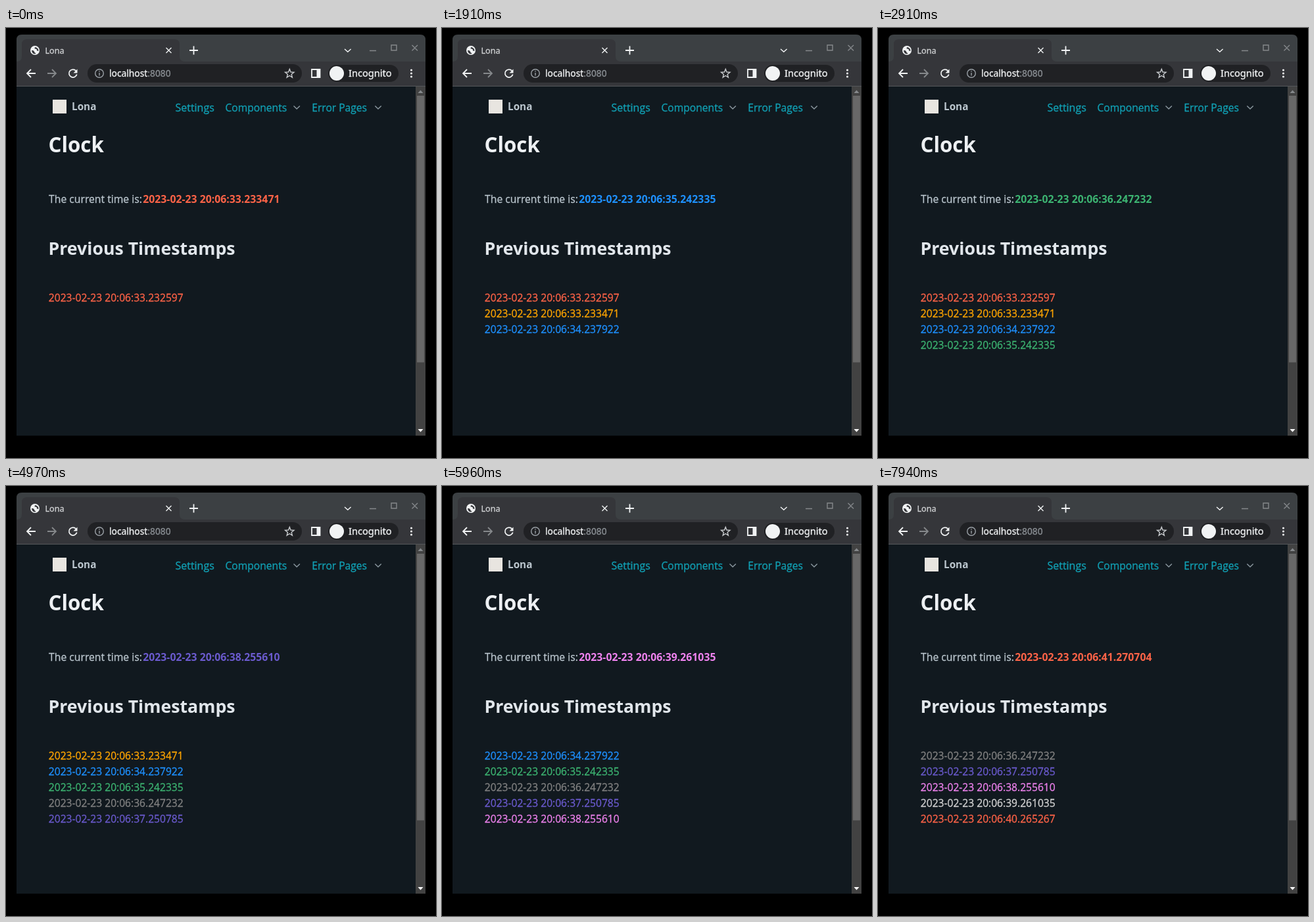
These frames come from a looping animation (654x654 px, 8000 ms). An HTML page:

```html
<!DOCTYPE html>
<html lang="en">
<head>
<meta charset="utf-8">
<title>Clock</title>
<style>
  html, body { margin: 0; width: 100%; height: 100%; overflow: hidden; background: #000; }
  svg { display: block; width: 100vw; height: 100vh; }
  text {
    font-family: "Open Sans", "Noto Sans", sans-serif; font-size: 15.6px; white-space: pre;
    fill: currentColor; stroke: currentColor; stroke-width: .3px;
  }
  tspan { fill: currentColor; stroke: currentColor; }
  .ui { font-family: "Noto Sans", sans-serif; color: #f1f3f4; }
  .bold { font-weight: 700; stroke: none; }
  .link { color: #11a0b4; }
  .line { fill: none; stroke: #f1f3f4; stroke-width: 1.8; }
  .thin { stroke-width: 1.4; }
  .dim { stroke: #85888b; }
</style>
</head>
<body>
<svg viewBox="0 0 654 654">
  <rect width="654" height="654"/>
  <path d="M16 620V18q0-8 8-8H630q8 0 8 8V620z" fill="#3c4043"/>

  <g id="tabs">
    <path d="M16 51q8 0 8-8V25q0-8 8-8H256q8 0 8 8V43q0 8 8 8z" fill="#35363a"/>
    <circle cx="44" cy="34" r="7" fill="#f1f3f4"/>
    <path d="M39 34q3.500-.5 4 2t2.500 2l-1 1.500q-5 0-5.500-5.500zM44 29l-.5 2.500 3 .5 .5 2.500 2.500.5q0-5-5.500-6z" fill="#35363a"/>
    <text class="ui" x="59.500" y="38.700" style="font-size:12.6px;color:#d0d2d4">Lona</text>
    <path d="M243.500 30l8 8m0-8l-8 8" class="line thin"/>
    <path d="M279 34h13M285.500 27.500v13" class="line"/>
    <path d="M515 32l4.800 4.300 4.800-4.300" class="line thin"/>
    <path d="M553 34.500h10M586 26h8v8h-8zM617.500 26l8.500 8.500m0-8.500l-8.500 8.500" class="line thin dim"/>
  </g>

  <g id="toolbar">
    <rect x="16" y="51" width="622" height="38" fill="#35363a"/>
    <path d="M16 88.500H638" stroke="#55585b"/>
    <path d="M45 69H32m6-6l-6 6 6 6" class="line"/>
    <path d="M63 69h13m-6-6l6 6-6 6" class="line dim"/>
    <path d="M106.500 65.200a6 6 0 1 0 1.200 5.300" class="line"/>
    <path d="M108.500 62.500v6h-6z" fill="#f1f3f4"/>
    <rect x="124" y="55" width="326" height="28" rx="14" fill="#202124"/>
    <circle cx="142" cy="69" r="6.300" class="line thin" style="stroke:#9aa0a6"/>
    <path d="M142 68v4.500M142 65v1.600" class="line thin" style="stroke:#9aa0a6"/>
    <text class="ui" x="157" y="73.700" style="font-size:13.8px">localhost<tspan style="color:#8b9095">:8080</tspan></text>
    <path id="star" class="line thin" style="stroke:#c6c9cc"/>
    <path d="M465 63h12.500v12H465z" class="line"/>
    <path d="M472.500 62.500h5.500v13h-5.500z" fill="#f1f3f4"/>
    <rect x="490" y="56" width="107" height="26" rx="13" fill="#202124"/>
    <circle cx="503" cy="69" r="11" fill="#f1f3f4"/>
    <text class="ui" x="521" y="74" style="font-size:14.6px">Incognito</text>
    <path d="M616.500 64v.01M616.500 69v.01M616.500 74v.01" class="line" style="stroke-width:3.2;stroke-linecap:round"/>
  </g>

  <g id="page" color="#bbc6ce">
    <rect x="16" y="89" width="607" height="531" fill="#11191f"/>
    <rect x="623" y="89" width="15" height="531" fill="#424242"/>
    <rect x="625" y="103" width="11" height="405.500" fill="#686868"/>
    <path d="M626.500 99l4-4.500 4 4.500z" fill="#85888b"/>
    <path d="M626.500 610l4 4.500 4-4.500z" fill="#fff"/>
    <rect x="71" y="109" width="21" height="21" fill="#e8e5e0"/>
    <text class="bold" x="100" y="125" style="font-size:15.3px">Lona</text>
    <text class="link" x="257.500" y="126.500" style="font-size:16px">Settings</text>
    <text class="link" x="333.500" y="126.500">Components</text>
    <text class="link" x="465.300" y="126.500">Error Pages</text>
    <path d="M437.500 118.500l4.700 4.500 4.700-4.500M561.300 118.500l4.700 4.500 4.700-4.500" class="line thin" style="stroke:#8a979f"/>
    <text class="bold" x="64.500" y="188.500" style="font-size:31.3px;color:#edf0f3">Clock</text>
    <text x="65" y="266" style="font-size:15.75px">The current time is:</text>
    <text id="current" class="bold" x="208.300" y="266" style="font-size:15.8px"></text>
    <text class="bold" x="64.500" y="345" style="font-size:26.7px;color:#e1e6eb">Previous Timestamps</text>
    <g id="history"></g>
  </g>
</svg>
<script>
const LOOP = 8000;
const MAX_ROWS = 5;
const ticks = [910, 1910, 2910, 3900, 4970, 5960, 6950, 7940];
const seconds = ["33.232597", "33.233471", "34.237922", "35.242335", "36.247232",
  "37.250785", "38.255610", "39.261035", "40.265267", "41.270704"];
const colors = ["tomato", "orange", "dodgerblue", "mediumseagreen", "gray",
  "slateblue", "violet", "lightgray"];

const byId = id => document.getElementById(id);
const current = byId("current");

const rows = Array.from({ length: MAX_ROWS }, (_, i) => {
  const row = document.createElementNS("http://www.w3.org/2000/svg", "text");
  row.setAttribute("x", 64.8);
  row.setAttribute("y", 416 + 24 * i);
  return byId("history").appendChild(row);
});

function starPath(cx, cy, outer, inner) {
  const points = Array.from({ length: 10 }, (_, i) => {
    const radius = i % 2 ? inner : outer;
    const angle = (i * 36 - 90) * Math.PI / 180;
    return `${cx + radius * Math.cos(angle)} ${cy + radius * Math.sin(angle)}`;
  });
  return `M${points.join("L")}Z`;
}

function showStamp(node, stamp, color) {
  node.textContent = stamp === undefined ? "" : `2023-02-23 20:06:${stamp}`;
  node.style.color = colors[color % colors.length];
}

let shown = -1;

function render(time) {
  const step = ticks.filter(tick => tick <= time).length;
  if (step === shown) return;
  shown = step;
  showStamp(current, seconds[step + 1], step);
  const first = Math.max(0, step + 1 - MAX_ROWS);
  rows.forEach((row, i) => {
    const index = first + i;
    showStamp(row, index <= step ? seconds[index] : undefined, index);
  });
}

function frame() {
  render(performance.now() % LOOP);
  requestAnimationFrame(frame);
}

byId("star").setAttribute("d", starPath(431.3, 69.5, 7, 3));
frame();
</script>
</body>
</html>
```
